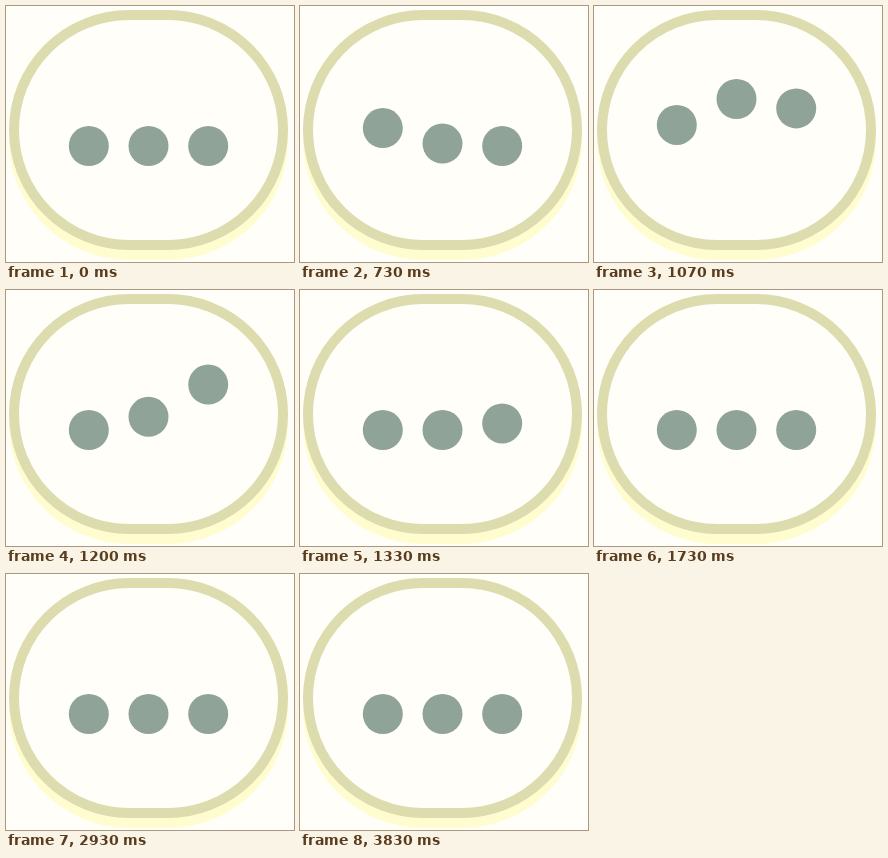
An HTML page that plays this animation: 288x256 px, repeating every 3.86 s.

```html
<!DOCTYPE html>
<html lang="en">
<head>
<meta charset="utf-8">
<title>Typing bubble</title>
<style>
  html, body { margin: 0; width: 100%; height: 100%; overflow: hidden; background: #fffef9; }
  svg { display: block; width: 100vw; height: 100vh; }
</style>
</head>
<body>
<svg viewBox="0 0 288 256">
  <rect width="288" height="256" fill="#fffef9"/>
  <rect x="3" y="14" width="279" height="240" rx="120" fill="#fffdd0"/>
  <rect x="8" y="9" width="269" height="230" rx="115" fill="#fffef9" stroke="#dddcae" stroke-width="10"/>
  <g fill="#8fa399">
    <circle class="dot" cx="82.8" cy="140" r="20"/>
    <circle class="dot" cx="142.5" cy="140" r="20"/>
    <circle class="dot" cx="202.2" cy="140" r="20"/>
  </g>
</svg>
<script>
  const LOOP = 3860, STEP = 100 / 3;
  const REST = 140, HEIGHT = 47, DELAY = 110;
  const START = 570, PEAK = 958, END = 1161;
  const dots = document.querySelectorAll('.dot');

  function ease(from, to, t) {
    const p = Math.min(1, Math.max(0, (t - from) / (to - from)));
    return p * p * (3 - 2 * p);
  }

  // Slower rise, quicker fall.
  const lift = t => HEIGHT * (ease(START, PEAK, t) - ease(PEAK, END, t));

  function draw(ms) {
    // Motion advances at 30 steps per second.
    const t = Math.floor((ms % LOOP + 3.5) / STEP) * STEP;
    dots.forEach((dot, i) => {
      dot.setAttribute('cy', (REST - lift(t - i * DELAY)).toFixed(2));
    });
  }

  const origin = performance.now();
  function tick() {
    draw(performance.now() - origin);
    requestAnimationFrame(tick);
  }
  tick();
</script>
</body>
</html>
```
